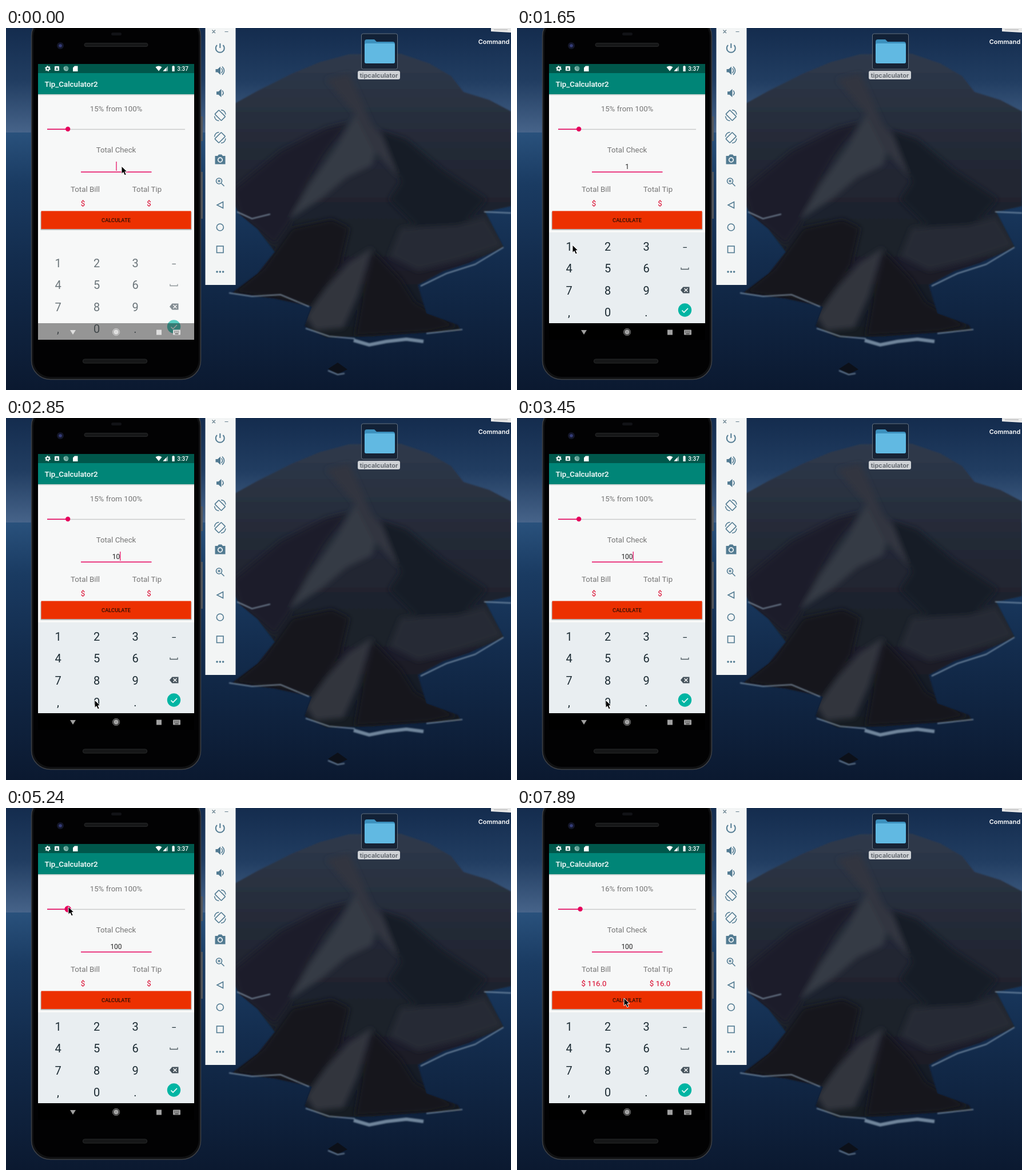
These frames come from a looping animation (883x634 px, 8 s). An HTML page:

```html
<!DOCTYPE html>
<html lang="en">
<head>
<meta charset="utf-8">
<title>Tip calculator</title>
<style>
html, body { margin: 0; width: 100%; height: 100%; overflow: hidden; background: #0d1c38; }
svg { display: block; width: 883px; height: 634px; }
text { font-family: Roboto, sans-serif; font-size: 13.3px; text-anchor: middle; }
.desk { font: 600 11px Inter, sans-serif; }
.line { fill: none; stroke: #527b92; stroke-width: 1.6; }
</style>
</head>
<body>
<svg viewBox="0 0 883 634">
<defs>
  <linearGradient id="sky" x2="0" y2="1"><stop stop-color="#142c4e"/><stop offset=".5" stop-color="#213d61"/><stop offset="1" stop-color="#47648a"/></linearGradient>
  <linearGradient id="sea" x2="0" y2="1"><stop stop-color="#29517c"/><stop offset=".2" stop-color="#1a3b62"/><stop offset=".5" stop-color="#132c4d"/><stop offset="1" stop-color="#0b1930"/></linearGradient>
  <linearGradient id="hill" x2="0" y2="1"><stop stop-color="#2f3a4c"/><stop offset=".3" stop-color="#252b38"/><stop offset=".6" stop-color="#1e222c"/><stop offset="1" stop-color="#161a24"/></linearGradient>
  <filter id="edge"><feGaussianBlur stdDeviation=".8"/></filter>
  <filter id="soft"><feGaussianBlur stdDeviation="5"/></filter>
  <clipPath id="land"><path id="coast" d="M395 135 440 110 500 80 548 60 600 46 690 45 740 62 778 84 800 112 845 126 883 146V312L838 322 870 384 808 412 765 426 720 450 735 500 790 520 796 530 740 533 640 540 560 542 522 522 535 488 470 474 395 464 440 430 470 392 440 352 408 326 395 300Z"/></clipPath>
  <clipPath id="screen"><rect x="56" y="63" width="273" height="483"/></clipPath>
</defs>

<!-- wallpaper -->
<rect width="883" height="184" fill="url(#sky)"/>
<rect y="183" width="883" height="451" fill="url(#sea)"/>
<use href="#coast" fill="url(#hill)" filter="url(#edge)"/>
<g clip-path="url(#land)"><g filter="url(#soft)">
  <path fill="#1a1f2a" d="M395 285 480 215 560 175 600 165 555 225 520 285 495 345 470 380 408 328Z"/>
  <path fill="#363a44" d="M612 150 650 200 640 240 595 262 550 300 495 335 530 275 580 205Z"/>
  <path fill="#31363f" d="M560 90 600 80 640 170 700 235 730 290 690 265 640 210 610 150Z"/>
  <path fill="#181c25" d="M655 180 700 195 765 250 840 300 800 345 720 350 670 300 690 270Z"/>
  <path fill="#12151d" d="M395 464 450 420 500 350 570 335 600 350 585 415 535 488 470 474Z"/>
  <path fill="#252a34" d="M690 350 790 345 838 330 870 382 790 408 720 425 670 400Z"/>
  <path fill="#30343e" d="M640 385 600 410 560 455 524 505 540 530 590 525 615 470Z"/>
  <path fill="#12161f" d="M642 390 690 440 715 480 790 522 740 533 610 540 622 470Z"/>
</g></g>
<path fill="#0c1019" d="M563 597 580 586 597 598 580 606Z"/>
<g fill="none" stroke="#9ab0c4" filter="url(#edge)" stroke-width="2" opacity=".7">
  <path d="M404 322 430 334 462 326M390 464 430 470 480 467 530 488M870 384 820 414 770 430 725 452M524 526 565 540 610 544M735 535 798 528M563 600 580 607 592 605M836 322 883 324"/>
  <path stroke-width="6" d="M608 547 635 555 665 549 700 545 730 549"/>
</g>

<!-- desktop items -->
<rect x="621.5" y="10" width="63" height="62" rx="3" fill="#111c2e" fill-opacity=".75" stroke="#65717f"/>
<path d="M627 24q0-4 4-4h13l4 4h28q4 0 4 4v31q0 3-4 3h-45q-4 0-4-3z" fill="#3c90bd"/>
<rect x="627" y="27" width="53" height="35" rx="3" fill="#61b9e2"/>
<rect x="615" y="75" width="74" height="15" rx="3" fill="#cfd2d6"/>
<text class="desk" x="652" y="86.5" fill="#5c626a">tipcalculator</text>
<path d="M848 0h35v8l-35-2z" fill="#e9e9e9"/><path d="M853 3h24" stroke="#aaa"/>
<text class="desk" x="853" y="28" fill="#fff">Command</text>

<!-- phone -->
<path d="M341 155h3v43h-3zM341 252h3v82h-3z" fill="#55585d"/>
<rect x="44.500" y="-19" width="296" height="634.500" rx="33" fill="#101113" stroke="#3e4146" stroke-width="1.500"/>
<rect x="48" y="-15" width="289" height="626" rx="30" fill="#020203"/>
<g fill="#161718" stroke="#272829">
  <rect x="137" y="26.500" width="111" height="6" rx="3"/><rect x="134.500" y="580" width="112" height="7" rx="3"/>
  <rect x="184" y="8" width="18" height="5" rx="2.500" stroke="none" fill="#111216"/>
</g>
<circle cx="95" cy="31" r="6" fill="#14172b"/><circle cx="95" cy="31" r="2.800" fill="#343c78"/>

<g clip-path="url(#screen)">
  <rect x="56" y="63" width="273" height="483" fill="#f7f8f8"/>
  <rect x="56" y="116" width="273" height="2" fill="#d2d8d7"/>
  <rect x="56" y="63" width="273" height="16" fill="#00574b"/>
  <rect x="56" y="79" width="273" height="37" fill="#008577"/>
  <g fill="#fff">
    <circle cx="73" cy="71" r="2.700" fill="none" stroke="#fff" stroke-width="2"/>
    <circle cx="73" cy="71" r="4.200" fill="none" stroke="#fff" stroke-width="1.400" stroke-dasharray="2 2.400"/>
    <rect x="85" y="67" width="8" height="8" rx="1"/>
    <text x="89" y="74" font-weight="700" style="font-size:7px" fill="#00574b">A</text>
    <circle cx="105" cy="71" r="4.500" fill="#62a196"/><path d="M102 68a4.500 4.500 0 0 0 6 6" fill="none" stroke="#b5d5cf"/>
    <path d="M120 66.500h5.500v9.500h-8.500v-6.500z"/>
    <path d="M261.500 68.500q5.500-4 11 0l-5.500 7z"/>
    <path d="M283 66.500v9h-8.500z" opacity=".55"/><path d="M280 69.500v6h-5.500z"/>
    <path d="M290.500 67h1v-1h2v1h1.200v9h-4.200z"/>
    <text x="309" y="75" font-weight="500" style="font-size:10px">3:37</text>
    <text x="114" y="103" font-weight="500">Tip_Calculator2</text>
  </g>

  <g fill="#757575">
    <text id="rate" x="192.500" y="146"></text>
    <text x="192.500" y="218">Total Check</text>
    <text x="138.500" y="287">Total Bill</text>
    <text x="246.500" y="287">Total Tip</text>
  </g>
  <path d="M72 177.500H313" stroke="#cbcbcb" stroke-width="1.400"/>
  <g fill="#e6005c">
    <rect id="bar" x="72" y="176.500" height="1.600"/>
    <circle id="thumb" cy="177"/>
    <rect x="131" y="251.500" width="123.500" height="1.500"/>
    <rect id="caret" y="234" width="1.200" height="16"/>
  </g>
  <text id="check" x="192.500" y="247" style="font-size:12px" fill="#222"></text>
  <g fill="#d80027">
    <text id="bill" x="134.500" y="312"></text>
    <text id="tip" x="250" y="312"></text>
  </g>
  <rect id="shade" x="60.500" y="322" width="264" height="32" rx="1" fill="#b5b8b8"/>
  <rect x="61.500" y="320.500" width="262" height="31.500" fill="#ec3000"/>
  <rect id="flash" x="61.500" y="320.500" width="262" height="31.500" fill="#fff"/>
  <text x="192.500" y="340" font-weight="500" style="font-size:9.300px" fill="#2a0d05">CALCULATE</text>

  <g id="pad">
    <rect id="padBack" x="56" y="358" width="273" height="188" fill="#e9eef1"/>
    <rect id="press" width="67" height="37" rx="3" fill="#cbd4d9"/>
    <g id="keys" fill="#1c2b33"></g>
    <path d="M287 419.500v3h13v-3" fill="none" stroke="#1c2b33" stroke-width="1.300" opacity=".75"/>
    <path d="M286 459l4.500-5.500h11v11h-11z" fill="#46535c"/>
    <path d="M292.500 456l6 6m0-6l-6 6" stroke="#fff" stroke-width="1.400"/>
    <circle cx="293.500" cy="494" r="11.700" fill="#00b5a3"/>
    <path d="M288.500 494.500l3.500 3.500 7-7" fill="none" stroke="#fff" stroke-width="1.600"/>
  </g>
  <rect id="nav" x="56" y="517" width="273" height="29"/>
  <g id="navIcons">
    <path d="M112 529h10l-5 8zM263 528.500h9v9h-9z"/>
    <circle cx="192.500" cy="532.500" r="4.500"/><circle cx="192.500" cy="532.500" r="6" fill="none" stroke-width="1"/>
    <rect x="292" y="528.500" width="13" height="9" rx="1"/>
    <path d="M294 531h9m-9 2.200h9" stroke="#222" stroke-width="1" stroke-dasharray="1.200 1.200"/><path d="M295.500 535.700h6" stroke="#222" stroke-width="1"/>
  </g>
</g>

<!-- emulator toolbar -->
<rect x="348.500" width="53" height="450" fill="#f3f5f5"/>
<path d="M360.500 3.500l5.500 5.500m0-5.500l-5.500 5.500M382.500 6.500h6" stroke="#66808e" stroke-width="1.200"/>
<g class="line">
  <path d="M369 30a7.500 7.500 0 1 0 10.500 0M374.300 27v8" stroke-width="2"/>
  <path d="M376.500 70.500q4 4 0 8.500M378 67.500q7 7 0 14.500M378 109.500q4 4 0 8.500"/>
  <g id="turn">
    <rect x="366.300" y="148" width="16" height="10" rx="1" transform="rotate(45 374.300 153)"/>
    <path d="M376 143.500q7 .5 8 8M372.500 162.500q-7-.5-8-8"/>
  </g>
  <use href="#turn" transform="translate(748.500 39) scale(-1 1)"/>
  <circle cx="372.500" cy="268" r="5"/><path d="M376.500 272l5 5M370 268h5M372.500 265.500v5" stroke-width="1.500"/>
  <path d="M379.500 304.500v11l-10.500-5.500z"/><circle cx="374.300" cy="349" r="6"/>
  <rect x="368.500" y="382" width="11.500" height="11.500"/>
</g>
<g fill="#527b92">
  <path id="horn" d="M366.500 72h3.500l5-4.500v14.500l-5-4.500h-3.500z"/><use href="#horn" x="1.500" y="39.300"/>
  <path d="M365.500 224h4.500l2-2.500h5l2 2.500h4.500v14.500h-18z"/>
  <circle cx="374.500" cy="231" r="3.800" fill="none" stroke="#f3f5f5" stroke-width="1.700"/>
  <circle cx="369" cy="427" r="1.800"/><circle cx="374.300" cy="427" r="1.800"/><circle cx="379.600" cy="427" r="1.800"/>
</g>

<path id="mouse" d="M0 0V13.500L3.200 10.700 5.500 16 8.200 14.800 5.900 9.700H10Z" fill="#000" stroke="#fff"/>
</svg>

<script>
const $ = id => document.getElementById(id);
const set = (id, attrs) => { for (const k in attrs) $(id).setAttribute(k, attrs[k]); };
const write = (id, s) => { if ($(id).textContent !== s) $(id).textContent = s; };
const between = (t, spans) => spans.some(([a, b]) => t >= a && t < b);

// keypad labels, row by row; icons fill the gaps
[..."123−456 789 ,0. "].forEach((label, i) => {
  if (label === " ") return;
  $("keys").innerHTML += `<text x="${91 + i % 4 * 67.5}" y="${390 + (i >> 2) * 38.4}" style="font-size:${label === "−" ? 16 : 20}px">${label}</text>`;
});

// pointer stops: time, x, y
const path = [
  [450, 202, 242], [1050, 104, 378], [1200, 97, 380], [1950, 97, 380], [2550, 155, 494],
  [3600, 155, 494], [4650, 104, 182], [5240, 109, 173], [5387, 111, 173], [5681, 111, 173],
  [6710, 174, 321], [6857, 180, 327], [7004, 187, 333]
];
const caretOn = [[0, 600], [1050, 1650], [2100, 2550], [2850, 3300], [3450, 3900],
  [4350, 4800], [5387, 5828], [6269, 6857], [7445, 7886]];

function pointer(t) {
  const i = path.findIndex(p => p[0] > t);
  if (i < 0) return path.at(-1).slice(1);
  if (!i) return path[0].slice(1);
  const [t0, x0, y0] = path[i - 1], [t1, x1, y1] = path[i];
  const f = (t - t0) / (t1 - t0);
  const e = t1 - t0 > 500 ? f * f * (3 - 2 * f) : f;
  return [x0 + (x1 - x0) * e, y0 + (y1 - y0) * e];
}

function draw(ms) {
  // the screen refreshes in coarse steps
  const t = ms < 5240 ? Math.floor(ms / 150) * 150 : 5240 + Math.floor((ms - 5240) / 147) * 147;

  const rise = Math.min(t / 300, 1), left = (1 - rise) ** 2;
  set("pad", { transform: `translate(0 ${29 * left})`, opacity: 1 - .36 * left });
  set("padBack", { opacity: 1 - left });
  set("nav", { opacity: t < 150 ? .4 : t < 300 ? .8 : 1 });
  const tint = t < 150 ? "#dedede" : "#a0a0a0";
  set("navIcons", { fill: tint, stroke: tint, "stroke-width": 0 });

  const one = between(t, [[1200, 1650]]), zero = between(t, [[2700, 2850], [3300, 3450]]);
  set("press", {
    x: one ? 58 : 125, y: one ? 364 : 480,
    opacity: one ? 1 - (t - 1200) / 600 : +zero
  });

  const typed = "100".slice(0, [1350, 2850, 3450].filter(k => t >= k).length);
  write("check", typed);
  set("caret", { x: 192.4 + typed.length * 3.4, opacity: +between(t, caretOn) });

  const rate = t < 5387 ? 15 : 16, x = 72 + rate * 2.41;
  write("rate", rate + "% from 100%");
  set("bar", { width: x - 72 });
  set("thumb", { cx: x, r: between(t, [[5100, 5828]]) ? 5.7 : 4.2 });

  const done = t >= 7592;
  write("bill", done ? "$ 116.0" : "$");
  write("tip", done ? "$ 16.0" : "$");
  const glow = between(t, [[7445, 7886]]) ? 1 - (t - 7445) / 441 : 0;
  set("flash", { opacity: glow * .25 });
  set("shade", { height: 32 + glow * 4 });

  set("mouse", { transform: `translate(${pointer(t)})` });
}

const start = performance.now();
function tick() {
  draw((performance.now() - start) % 8000);
  requestAnimationFrame(tick);
}
tick();
</script>
</body>
</html>
```
